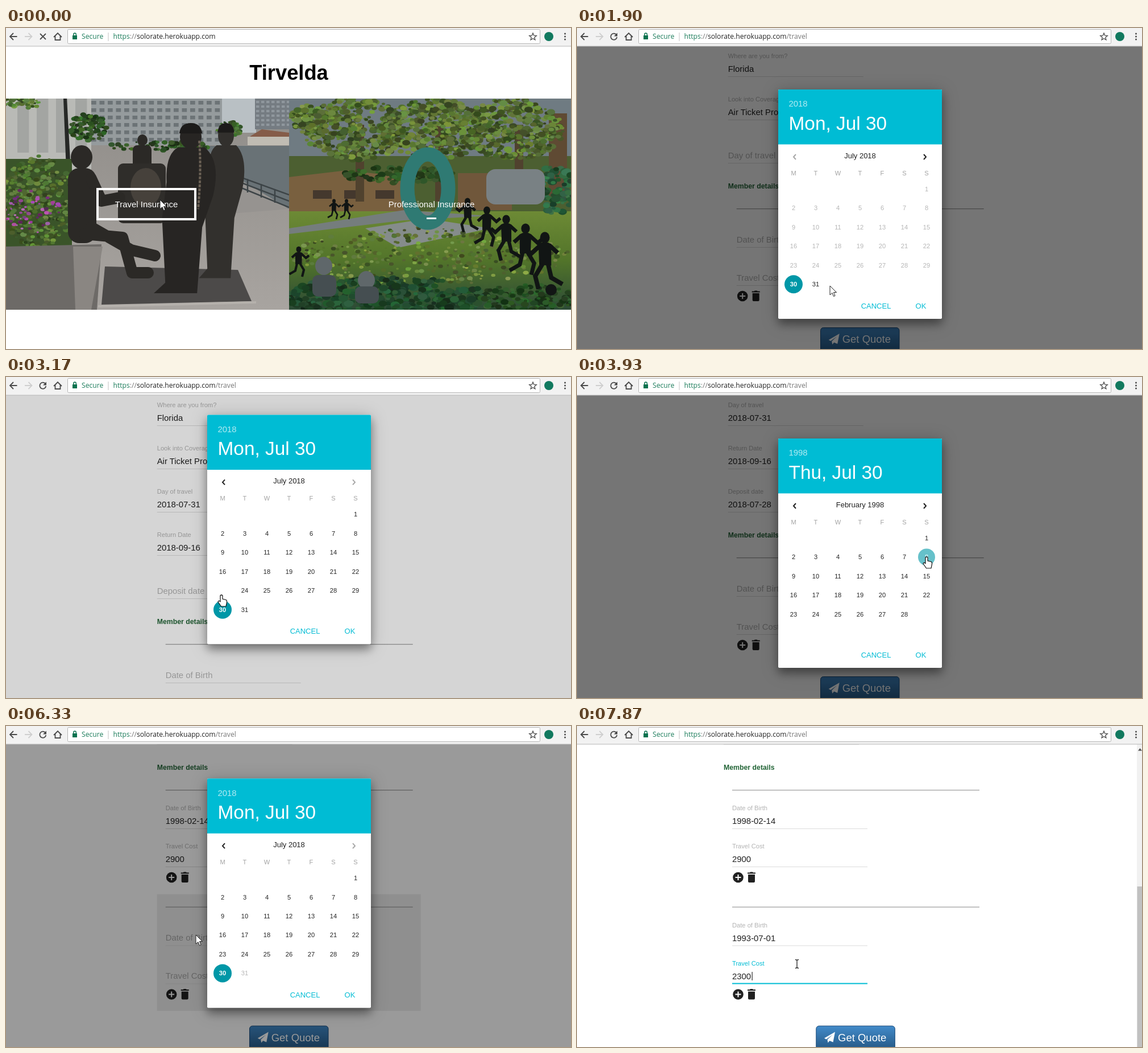
Recreate the animation shown at these times as an HTML page. Size 994 by 564 pixels, loop 8 s.

```html
<!DOCTYPE html>
<html lang="en">
<head>
<meta charset="utf-8">
<title>Insurance quote</title>
<style>
html, body { margin: 0; width: 100%; height: 100%; overflow: hidden; background: #fff }
svg { display: block; position: absolute; left: 0; top: 0; font-family: "Liberation Sans", Arial, sans-serif }
text { white-space: pre }
.ui { font-family: "Open Sans", "Noto Sans", sans-serif; font-size: 12.15px }
.paper { filter: drop-shadow(0 9px 8px rgba(0,0,0,.36)) drop-shadow(0 2px 14px rgba(0,0,0,.2)) }
</style>
</head>
<body>
<svg width="994" height="564" viewBox="0 0 994 564">
  <defs>
    <linearGradient id="btn" x2="0" y2="1"><stop stop-color="#428bca"/><stop offset="1" stop-color="#245682"/></linearGradient>
    <linearGradient id="pave" x2="0" y2="1"><stop stop-color="#8f8c88"/><stop offset="1" stop-color="#a8a4a0"/></linearGradient>
    <linearGradient id="lawn" x2="0" y2="1"><stop stop-color="#6d8a35"/><stop offset=".5" stop-color="#52742a"/><stop offset="1" stop-color="#2c4a36"/></linearGradient>
    <clipPath id="left"><rect y="124" width="498" height="371"/></clipPath>
    <clipPath id="right"><rect x="498" y="124" width="496" height="371"/></clipPath>
  </defs>
  <g id="home"></g>
  <g id="page"></g>
  <g id="bar"></g>
  <g id="cursor"></g>
</svg>
<script>
const $ = id => document.getElementById(id);
const clamp = v => Math.max(0, Math.min(1, v));
const mix = (a, b, k) => a + (b - a) * k;
const ramp = (t, from, to) => clamp((t - from) / (to - from));
const loop = (n, f) => Array.from({ length: n }, (_, i) => f(i)).join('');
const INK = '#212121', HINT = 'rgba(0,0,0,.3)', CYAN = '#00bcd4', TEAL = '#0097a7';

// Text placed by the middle of its capitals
const text = (x, y, s, size, fill = INK, more = '') =>
  `<text x="${x}" y="${y + size * .36}" font-size="${size}" fill="${fill}" ${more}>${s}</text>`;
const MID = 'text-anchor="middle"', BOLD = 'font-weight="700"';
const rect = (x, y, w, h, fill, more = '') =>
  `<rect x="${x}" y="${y}" width="${w}" height="${h}" fill="${fill}" ${more}/>`;
const path = (d, fill, more = '') => `<path d="${d}" fill="${fill}" ${more}/>`;
const line = (d, color, w, more = '') => path(d, 'none', `stroke="${color}" stroke-width="${w}" ${more}`);
const oval = (x, y, rx, ry, fill, more = '') =>
  `<ellipse cx="${x}" cy="${y}" rx="${rx}" ry="${ry}" fill="${fill}" ${more}/>`;
const put = (x, y, kx, ky, s) => `<g transform="translate(${x} ${y}) scale(${kx} ${ky})">${s}</g>`;

// ---- Home page pictures ----
let seed = 7;
const rnd = () => (seed = seed * 16807 % 2147483647) / 2147483647;

// Leaf blots spread over an ellipse, in greens around one hue
const leaves = (n, x, y, w, h, r, hue, light) => loop(n, () => {
  const a = rnd() * 2 * Math.PI, d = Math.sqrt(rnd()), k = r * (.5 + rnd());
  const color = `hsl(${hue + rnd() * 20 | 0} ${30 + rnd() * 18 | 0}% ${light * (.6 + rnd() * .8) | 0}%)`;
  return oval((x + w * d * Math.cos(a)).toFixed(1), (y + h * d * Math.sin(a)).toFixed(1), k.toFixed(1), (k * .7).toFixed(1), color);
});
const windows = (x, y, cols, rows, dx, dy, fill) =>
  loop(cols * rows, i => rect(x + i % cols * dx, y + (i / cols | 0) * dy, dx * .6, dy * .5, fill));
const man = (x, w, h, fill) => put(x, 167, w / 100, h / 100,
  path('M-20 14Q-40 18-38 34L-45 55-40 92-58 98H10L18 60 35 42Q48 22 22 14Z', fill) +
  oval(0, 8, 17, 7, fill) + path('M-18 6Q-16 0 0 0 16 0 18 6Z', '#1c1b1a'));
const runner = (x, y, k, flip = 1) => put(x, y, k * flip, k,
  oval(0, -36, 6, 7, '#111514') + path('M-8-28Q0-33 8-28L7-2-8-1Z', '#111514') +
  line('M6-26L17-16 24-22M-6-26L-16-17M3-3L12 12 8 28M-4-3L-8 14-22 22', '#111514', 5.5));

function photo() {
  const bronze = '#2b2926', round = 'stroke-linecap="round" stroke-linejoin="round"';
  return rect(0, 124, 498, 371, 'url(#pave)') +
    rect(150, 124, 235, 82, '#959b9d') + windows(150, 128, 16, 6, 14.5, 13, '#6c7376') +
    rect(380, 124, 60, 60, '#b9c0c4') + rect(438, 124, 60, 54, '#757c82') + windows(440, 128, 7, 6, 9, 8, '#8f979d') +
    rect(0, 124, 150, 130, '#b9bab6') + windows(20, 124, 4, 1, 34, 190, '#a3a5a2') +
    path('M430 190L450 178 498 184V206H425Z', '#855c49') + rect(425, 191, 73, 15, '#c0bcb3') +
    rect(345, 207, 153, 110, '#697276') + path('M345 207L410 265 498 318 345 330Z', '#969390') +
    loop(3, i => line(`M412 ${262 + 9 * i}L498 ${293 + 11 * i}M${425 + 24 * i} ${265 + 9 * i}v24`, '#3d4447', 2.5)) +
    leaves(120, 145, 175, 34, 24, 4, 95, 24) + leaves(80, 270, 207, 95, 8, 4, 95, 22) +
    leaves(50, 392, 178, 22, 14, 4, 90, 27) + leaves(50, 22, 132, 40, 10, 4, 80, 32) +
    path('M101 124H107L114 250H106Z', '#262826') +
    rect(0, 230, 116, 155, '#3a5429') + leaves(420, 56, 305, 64, 80, 4, 80, 30) + leaves(60, 45, 320, 50, 40, 3, 290, 42) +
    path('M0 384L168 380 160 495H0Z', '#6d6a67') + path('M118 384H170L150 495H122Z', '#8a8682') +
    path('M174 419L408 425 432 480 168 486Z', '#4c4a49') + line('M162 489L440 482', '#b5b1ac', 4) +
    oval(240, 197, 9, 10, bronze) + rect(223, 206, 33, 40, bronze, 'rx="8"') +
    rect(197, 238, 84, 105, '#2f2d2a', 'rx="9"') + oval(246, 280, 27, 34, '#46413b') +
    oval(133, 227, 19, 21, bronze) + rect(109, 246, 50, 132, bronze, 'rx="20"') +
    line('M138 362L205 368 222 430H250M150 350L220 390 262 400M150 265L168 304 200 298', bronze, 20, round) +
    man(387, 82, 278, '#32302d') + man(325, 112, 305, '#272523') +
    line('M340 198Q344 250 338 318', '#6a6054', 4, 'stroke-dasharray="5 2"');
}

function painting() {
  return rect(498, 124, 496, 371, '#6f7b82') + rect(498, 225, 496, 100, '#4c5f31') +
    path('M498 262L600 250 700 262V328H498Z', '#79603f') + rect(795, 255, 95, 65, '#70573b') +
    windows(540, 285, 3, 1, 55, 30, '#44382d') + rect(498, 322, 496, 173, 'url(#lawn)') +
    loop(3, i => rect(615 + 140 * i, 170, 15, 135, '#50422e')) + rect(955, 150, 32, 150, '#5f4a33') +
    loop(3, i => leaves(430, 615 + 137 * i, 178, 92, 54, 5, 75, 31)) + leaves(90, 530, 160, 32, 24, 5, 75, 34) +
    leaves(120, 695, 258, 100, 14, 5, 95, 22) + leaves(110, 965, 285, 38, 42, 6, 130, 26) +
    rect(845, 248, 103, 62, '#798184', 'rx="16"') +
    path('M498 352L700 320 850 330 700 338 498 362Z', '#757d7d') +
    path('M632 352L740 335 852 352 690 386Z', '#858c8b') +
    leaves(420, 745, 400, 245, 50, 3.5, 72, 34) +
    oval(742, 282, 36, 60, 'none', 'stroke="#2f7a73" stroke-width="25"') +
    leaves(460, 670, 472, 180, 34, 6, 125, 21) + leaves(160, 915, 475, 85, 24, 5, 105, 22) +
    [559, 634].map((x, i) => oval(x, 418 + 25 * i, 15, 16, '#5f676a') + rect(x - 20, 434 + 20 * i, 42, 38 - 8 * i, '#454e51', 'rx="10"')).join('') +
    loop(5, i => runner(812 + 34 * i, 335 + 21 * i, .85 + .14 * i, i % 2 ? 1 : -1)) +
    loop(2, i => runner(577 + 22 * i, 322, .5)) + runner(515, 416, .75) + oval(959, 460, 10, 10, '#121615');
}

const heading = (x, y) => text(x, y, 'Tirvelda', 36.3, '#000', MID + BOLD);
$('home').innerHTML = rect(0, 32, 994, 532, '#fff') + heading(497.5, 78) +
  `<g clip-path="url(#left)">${photo()}</g><g clip-path="url(#right)">${painting()}</g>` +
  rect(161, 283, 172, 53, 'none', 'stroke="#fff" stroke-width="4"') +
  text(247, 310, 'Travel Insurance', 14.9, '#fff', MID) +
  text(748.5, 310, 'Professional Insurance', 14.9, '#fff', MID) + rect(740, 333, 17, 3, '#fff');

// ---- Story: each date picker opens, gets a day and closes ----
const TODAY = '2018-07-30';
const DIALOGS = [
  { name: 'Day of travel', open: 1590, pick: 2100, close: 2170, from: TODAY, to: '2018-07-31', min: TODAY, spot: [330, 225] },
  { name: 'Return Date', open: 2360, pick: 2630, close: 2700, from: '2018-07-31', to: '2018-09-16', min: '2018-07-31', spot: [330, 300] },
  { name: 'Deposit date', open: 3168, pick: 3330, close: 3400, from: TODAY, to: '2018-07-28', max: '2018-07-31', spot: [379, 383] },
  { name: 'Date of Birth', open: 3560, pick: 4850, close: 5157, from: TODAY, to: '1998-02-14', max: TODAY, spot: [330, 371] },
  { name: 'Date of Birth', open: 6268, pick: 6890, close: 7420, from: TODAY, to: '1993-07-01', max: TODAY, spot: [334, 367] }
];
const COSTS = [{ text: '2900', start: 5230, gap: 25 }, { text: '2300', start: 7640, gap: 75 }];
const CHOICES = [
  { name: 'Where are you from?', to: 'Florida', open: 610, close: 1060, y: 166,
    items: ['Connecticut', 'Delaware', 'Florida', 'Georgia', 'Hawaii', 'Idaho', 'Illinois'] },
  { name: 'Look into Coverages', to: 'Air Ticket Protection', open: 1130, close: 1200, y: 242,
    items: ['Air Ticket Protection', 'Trip Cancellation', 'Medical Cover'] }
];
const GROWN = 1270, SECOND = 5370;

const scrollTop = t => 128 - 79 * ramp(t, 1330, 1440) - 152 * ramp(t, 3470, 3540) - 205 * ramp(t, 5360, 5410);

// ---- Calendar ----
const parse = iso => new Date(iso + 'T00:00');
const firstColumn = d => (new Date(d.getFullYear(), d.getMonth(), 1).getDay() + 6) % 7;
function cell(d) {
  const i = firstColumn(d) + d.getDate() - 1;
  return [381 + 39 * (i % 7), 283 + 33.45 * (i / 7 | 0)];
}

// Month in view and day chosen: the year jumps, then the months turn one by one
function calendar(d, t) {
  const a = parse(d.from), b = parse(d.to), k = ramp(t, d.open + 100, d.open + 300);
  const year = (k ? b : a).getFullYear();
  return {
    view: new Date(year, Math.round(mix(a.getMonth(), b.getMonth(), k)), 1),
    chosen: t >= d.pick ? b : new Date(year, a.getMonth(), a.getDate())
  };
}

const chevron = (x, dir, on) =>
  line(`M${x - 2 * dir} 222l${4 * dir} 4.5l${-4 * dir} 4.5`, on ? INK : '#a8a8a8', 2);

function picker(d, t, p, mx, my) {
  const { view, chosen } = calendar(d, t), year = view.getFullYear(), month = view.getMonth();
  const min = d.min ? parse(d.min) : -Infinity, max = d.max ? parse(d.max) : Infinity;
  const last = new Date(year, month + 1, 0), [wd, mo] = chosen.toDateString().split(' ');
  let hand = false;
  let s = rect(354, 108, 288, 403, '#fff', 'class="paper" rx="2"') +
    path('M354 204.500V110q0-2 2-2H640q2 0 2 2V204.500Z', CYAN) +
    text(372.5, 133, chosen.getFullYear(), 14.9, 'rgba(255,255,255,.7)') +
    text(372.5, 167, `${wd}, ${mo} ${chosen.getDate()}`, 33.4, '#fff') +
    chevron(383, -1, view > min) + chevron(612, 1, last < max) +
    text(498, 224, view.toLocaleString('en', { month: 'long' }) + ' ' + year, 13, INK, MID);
  s += loop(7, i => text(381 + 39 * i, 255, 'MTWTFSS'[i], 11.1, '#a3a3a3', MID));
  for (let n = 1; n <= last.getDate(); n++) {
    const day = new Date(year, month, n), [x, y] = cell(day);
    const on = day >= min && day <= max, sel = +day === +chosen;
    const hover = on && !sel && Math.hypot(mx - x, my - y) < 15;
    hand = hand || hover;
    if (sel) s += oval(x, y, 16, 16, TEAL);
    if (hover && p > .5) s += oval(x, y, 15, 15, TEAL, 'opacity=".6"');
    s += text(x, y, n, 11.1, sel || hover ? '#fff' : on ? INK : '#b5b5b5', MID + (sel ? BOLD : ''));
  }
  if (Math.abs(mx - 605) < 30 && Math.abs(my - 487) < 17) s += rect(575, 470.5, 60, 33.5, 'rgba(0,0,0,.07)', 'rx="2"');
  return [s + text(526, 488, 'CANCEL', 13, CYAN, MID) + text(605, 488, 'OK', 13, CYAN, MID), hand];
}

// ---- Pointer: rests at each stop, then glides to reach the next one on time ----
const STOPS = [[0, 271, 302], [300, 350, 152], [820, 300, 249], [1200, 320, 265], [1800, 445, 453],
  [3930, 615, 316], [5410, 322, 400], [5950, 334, 367], [7490, 387, 418]];
for (const d of DIALOGS) STOPS.push([d.open - 100, ...d.spot], [d.pick, ...cell(parse(d.to))], [d.pick + 70, 607, 484]);
STOPS.sort((a, b) => a[0] - b[0]);

function pointer(t) {
  const i = STOPS.findLastIndex(s => s[0] <= t), [from, x, y] = STOPS[i], [to, x2, y2] = STOPS[i + 1] || [9000, x, y];
  const k = ramp(t, Math.max(from, to - 150), to);
  return [mix(x, x2, k), mix(y, y2, k)];
}

// ---- Form ----
function field(x, y, t, label, value, since, focus) {
  const k = clamp((t - since) / 160), size = mix(14.9, 11.15, k);
  return text(x, mix(y - .5, y - 23, k), label, size, focus ? CYAN : HINT) +
    (t >= since ? text(x, y, value, 14.9) : '') +
    (focus ? rect(x, y + 12, 238, 2, CYAN) : rect(x, y + 13, 238, 1, '#dcdcdc'));
}

function member(y, t, i, x) {
  const birth = DIALOGS[3 + i], { text: full, start, gap } = COSTS[i];
  const cost = full.slice(0, Math.max(0, Math.floor((t - start) / gap) + 1));
  const focus = i && t > 7500, px = x + 10.5, iy = y + 153.5;
  return (i && t < birth.close ? rect(x - 15, y - 22.5, 464, 205, 'rgba(0,0,0,.07)') : '') +
    rect(x, y - .5, 435, 1.3, '#a2a2a2') +
    field(x, y + 54.5, t, birth.name, birth.to, birth.close - 60) +
    field(x, y + 121.5, t, 'Travel Cost', cost, start - 140, focus) +
    (focus ? rect(x + 1.5 + cost.length * 8.28, y + 114, 1, 15, '#000') : '') +
    oval(px, iy, 9.3, 9.3, INK) + line(`M${px - 5} ${iy}h10M${px} ${iy - 5}v10`, '#fff', 2) +
    path(`M${x + 27} ${iy - 8.5}h4l1-1h4l1 1h4v2h-14zM${x + 28} ${iy - 5}h12v12q0 2-2 2h-8q-2 0-2-2z`, INK);
}

function menu(c, t) {
  if (t < c.open || t >= c.close) return '';
  const k = ramp(t, c.open - 60, c.open + 120), n = c.items.length;
  return `<g opacity="${k}">` + rect(265, c.y, 290, (n * 29.7 + 15) * k, '#fff', 'class="paper" rx="2"') +
    loop(Math.floor(n * k), i => text(281, c.y + 22 + i * 29.7, c.items[i], 14.9)) + '</g>';
}

function form(t, top, dx) {
  const x = 265.7 + dx, dates = DIALOGS.slice(0, 3).filter((d, i) => t >= (i ? DIALOGS[i - 1].close : GROWN));
  const rows = [...CHOICES, ...dates];
  let s = heading(497.5 + dx, top - 50);
  rows.forEach((f, i) => s += field(x, top + 23 + 76 * i, t, f.name, f.to, f.close));
  if (t >= GROWN) {
    const y = top + 76 * rows.length + 1, count = t < SECOND ? 1 : 2, by = y + 42.5 + 205.5 * count;
    s += text(x, y, 'Member details', 12.3, '#226436', BOLD) +
      loop(count, i => member(y + 39.5 + 205.5 * i, t, i, x + 15)) +
      rect(x + 162.8, by + .5, 138.5, 43, 'url(#btn)', 'rx="5" stroke="#1c4a78"') +
      path(`M${x + 177} ${by + 22}l19-11-3.5 18-6-2.5-3 3.5-1-5.5 9-8.5-11 8z`, '#fff') +
      text(x + 201, by + 20.5, 'Get Quote', 18.5, '#fff');
  }
  return s + CHOICES.map(c => menu(c, t)).join('');
}

// ---- Browser bar ----
function bar(t) {
  const grey = '#4a4a4a', green = '#1d7d5c', soft = s => `<tspan fill="#777">${s}</tspan>`;
  const stroke = (d, c = grey) => line(d, c, 1.8);
  const star = loop(10, i => {
    const a = i * Math.PI / 5, r = i % 2 ? 2.9 : 6.6;
    return `${927 + r * Math.sin(a)} ${15.5 - r * Math.cos(a)} `;
  });
  return rect(0, 0, 994, 32, '#f2f2f2') + rect(0, 31.5, 994, 1, '#b8b8b8') +
    rect(108.5, 2.5, 831, 25, '#fff', 'stroke="#b4b4b4" rx="2"') +
    stroke('M19.5 15H7M13 9L7 15l6 6') + stroke('M33 15H45.5M39.5 9l6 6-6 6', '#cfcfcf') +
    (t < 300 ? stroke('M60 10l10 10M70 10l-10 10') :
      stroke('M69 11.5A5.500 5.500 0 1 0 70.300 16') + path('M71 8.500v6h-6z', grey)) +
    stroke('M84 16l7-7 7 7M86.500 14v7h9v-7') +
    rect(117, 13, 8, 7, '#0b7350') + line('M118.700 13v-1.500a2.300 2.500 0 0 1 4.600 0V13', '#0b7350', 1.4) +
    `<text class="ui" x="133" y="19" fill="${green}">Secure</text>` + rect(179.5, 8, 1, 15, '#c4c4c4') +
    `<text class="ui" x="188.5" y="19" fill="#222"><tspan fill="${green}">https</tspan>${soft('://')}solorate.herokuapp.com${soft(t < 150 ? '' : '/travel')}</text>` +
    `<polygon points="${star}" fill="none" stroke="${grey}" stroke-width="1.3"/>` +
    oval(955, 15, 8, 8, '#11795f') + loop(3, i => oval(983.5, 10 + 5 * i, 1.5, 1.5, grey));
}

const SHAPES = {
  arrow: path('M0 0V16L4 12.5 6.5 18.5 9 17.5 6.5 11.5H11.5Z', '#fff', 'stroke="#222"'),
  hand: path('M-2 1Q0-1 2 1V7L8 8.5Q10 9.5 9.5 13L8 20H-.5L-6 12Q-5 9-2 11.5Z', '#fff', 'stroke="#111" stroke-width="1.2"'),
  beam: line('M-3-7.5Q0-7.5 0-5.5V5.5Q0 7.5-3 7.5M3-7.5Q0-7.5 0-5.5M0 5.5Q0 7.5 3 7.5', '#222', 1.3)
};

const shown = {};
function show(id, html) {
  if (shown[id] !== html) $(id).innerHTML = shown[id] = html;
}

function draw() {
  const t = performance.now() % 8000, [mx, my] = pointer(t), top = scrollTop(t);
  const d = DIALOGS.find(d => t >= d.open && t < d.close + 100);
  const closing = d && t >= d.close, scrollbar = t >= GROWN && (!d || closing), dx = scrollbar ? -7.7 : 0;
  const home = t < 220;
  let page = '', shape = t > 7440 ? 'beam' : 'arrow';
  if (!home) page = rect(0, 32, 994, 532, '#fff') + form(t, top, dx);
  if (d) {
    const p = closing ? .7 * (1 - ramp(t, d.close, d.close + 100)) : mix(.28, 1, ramp(t, d.open, d.open + 100));
    const y = -59.5 * (1 - p), [box, hand] = picker(d, t, p, mx - dx, my - y);
    if (hand) shape = 'hand';
    page += rect(0, 32, 994, 532, '#000', `opacity="${.54 * p}"`) +
      `<g transform="translate(${dx} ${y})" opacity="${closing ? p + .05 : 1}">${box}</g>`;
  }
  if (scrollbar) {
    const s = 128 - top;
    page += rect(985, 32, 9, 532, '#f1f1f1') + path('M987 43.5l3.5-4.5 3.5 4.5z', '#505050') +
      rect(985.5, 49 + 500 * s / (500 + s), 8.5, 520, '#c1c1c1');
  }
  $('home').style.display = home ? '' : 'none';
  show('page', page);
  show('bar', bar(t));
  show('cursor', put(mx.toFixed(1), my.toFixed(1), 1, 1, SHAPES[shape]));
  requestAnimationFrame(draw);
}
draw();
</script>
</body>
</html>
```
